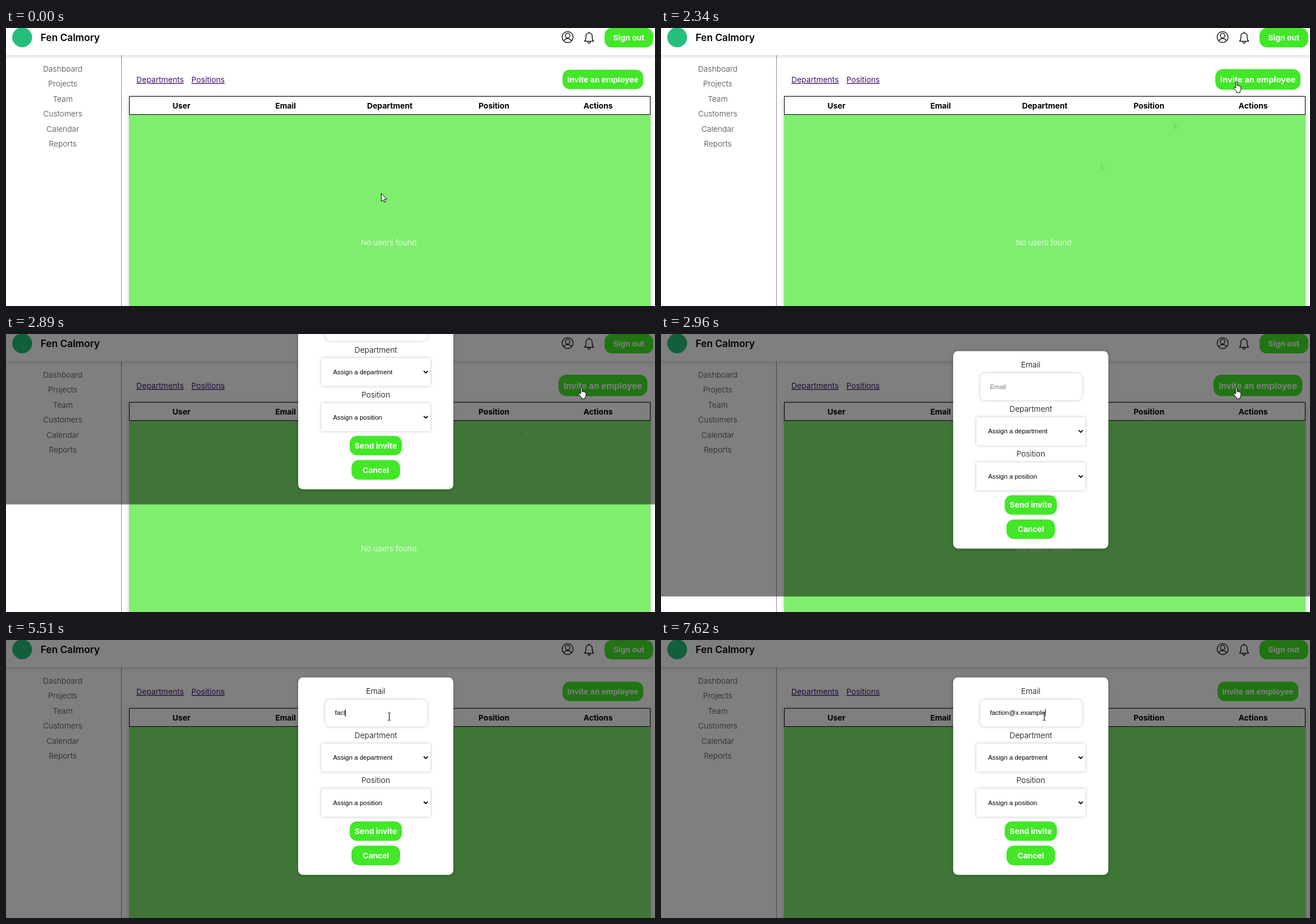
An HTML page that plays this animation: 1144x490 px, repeating every 8000 ms.

```html
<!DOCTYPE html>
<html lang="en">
<head>
<meta charset="utf-8">
<title>Invite an employee</title>
<style>
  html, body { margin: 0; width: 100%; height: 100%; overflow: hidden; background: #fff; }
  svg { display: block; width: 100vw; height: 100vh; }
  text { font: 300 13.71px Inter, sans-serif; fill: #000; white-space: pre; }
  .mid { text-anchor: middle; }
  .bold { font-weight: 700; }
  .brand { font-size: 17.14px; font-weight: 600; }
  .nav { fill: #444; }
  .link { fill: #3f1470; font-weight: 400; text-decoration: underline; }
  .empty { fill: #fff; }
  .field { font: 11.43px "Liberation Sans", Arial, sans-serif; }
  .hint { fill: #757575; }
  .button rect { fill: #42e728; }
  .button text { fill: #fff; font-weight: 700; text-anchor: middle; }
  .box { fill: #fff; filter: drop-shadow(0 0 2.5px rgba(0, 0, 0, .25)); }
  .icon { fill: none; stroke: #000; stroke-width: 1.3; stroke-linejoin: round; }
  .pointer { fill: #fff; stroke: #000; stroke-linejoin: round; }
</style>
</head>
<body>
<svg viewBox="0 0 1144 490" preserveAspectRatio="none">
  <defs>
    <path id="arrowShape" d="M.5.5V14.7L3.7 11.7 6 16.4 8.2 15.4 6 10.7H10.3Z"/>
    <clipPath id="listArea"><path d="M217 153.5H1136V490H217Z"/></clipPath>
  </defs>

  <rect width="1144" height="490" fill="#fff"/>
  <path d="M203.5 48V490" stroke="#8a8a8a"/>
  <rect x="-10" y="-10" width="1164" height="58" fill="#fff" style="filter:drop-shadow(0 1px 3px rgba(0,0,0,.2))"/>
  <circle cx="28.5" cy="16.5" r="17.5" fill="#25bf7b"/>
  <text class="brand" x="61" y="23">Fen Calmory</text>
  <g class="icon">
    <circle cx="990" cy="16" r="9.7"/>
    <circle cx="990" cy="13.4" r="4"/>
    <path d="M983.5 22.8Q985 18.6 990 18.6T996.5 22.8"/>
    <path d="M1019.8 23.4Q1022.3 21 1022.3 16V14Q1022.3 9.3 1027.8 8.6Q1033.3 9.3 1033.3 14V16Q1033.3 21 1035.8 23.4ZM1027.8 8.6V6.6M1025.6 24Q1025.8 26.9 1027.8 26.9T1030 24"/>
  </g>
  <g id="nav"></g>
  <text class="link" x="229.8" y="96">Departments</text>
  <text class="link" x="326.8" y="96">Positions</text>

  <rect x="217" y="121" width="919" height="400" fill="#7fee6f" style="filter:drop-shadow(0 0 3px rgba(0,0,0,.25))"/>
  <rect x="217.5" y="120.5" width="918" height="32" fill="#fff" stroke="#000"/>
  <g id="heads"></g>
  <text class="empty mid" x="676.5" y="383">No users found.</text>
  <g id="trail" clip-path="url(#listArea)"></g>
  <g id="pageButtons"></g>

  <rect id="shade" y="-520" width="1144" height="1017" fill="#000" fill-opacity=".5"/>
  <g id="modal">
    <rect x="515" y="66" width="273.5" height="348" rx="8.5" fill="#fff" style="filter:drop-shadow(0 1px 3px rgba(0,0,0,.25))"/>
    <rect class="box" x="562.5" y="105" width="180" height="47.5" rx="9"/>
    <rect class="box" x="556" y="182.5" width="192" height="49.5"/>
    <rect class="box" x="556" y="262" width="192" height="49.5"/>
    <g id="labels"></g>
    <text class="field" x="576.5" y="211">Assign a department</text>
    <text class="field" x="576.5" y="291">Assign a position</text>
    <path d="M736.3 205.3l3.6 3.6 3.6-3.6m-7.2 79.5l3.6 3.6 3.6-3.6" fill="none" stroke="#000" stroke-width="1.8"/>
    <text class="field hint" id="hint" x="579.8" y="132.4">Email</text>
    <text class="field" id="typed" x="579.8" y="132.4"></text>
    <rect id="caret" y="122" width="1" height="13"/>
    <g id="modalButtons"></g>
  </g>

  <g class="pointer">
    <use id="arrow" href="#arrowShape"/>
    <path id="hand" d="M4.5 12V2Q4.5.5 5.8.5T7.1 2V7.6Q8.7 6.4 9.7 8Q11.2 7.2 11.9 8.8Q13.7 8.4 13.7 10.4V14.5L12.2 18V20H5.9V18L1.2 12.5Q.5 11 1.8 10.4Q3 10 4.5 12Z"/>
    <path id="beam" fill="none" d="M-2.5-6.5H-1L0-6 1-6.5H2.5M0-6V6M-2.5 6.5H-1L0 6 1 6.5H2.5"/>
  </g>
</svg>
<script>
const LOOP = 8000;
const START = 1380, STEP = 68.8; // the screen refreshes in steps
const EMAIL = 'faction@x.example';
const BURSTS = [ // typing: first key, last key, number of keys
  { from: 4850, to: 5510, keys: 4 },
  { from: 5580, to: 5800, keys: 3 },
  { from: 6150, to: 7620, keys: 10 },
];

const $ = id => document.getElementById(id);
const clamp = (v, lo, hi) => Math.min(hi, Math.max(lo, v));
const progress = (k, from, to) => clamp((k - from) / (to - from), 0, 1);
const smooth = p => p * p * (3 - 2 * p);
const easeOut = p => 1 - (1 - p) ** 2;
const mix = (a, b, p) => a + (b - a) * p;
const move = (el, x, y) => el.setAttribute('transform', `translate(${x} ${y})`);
const show = (el, on) => el.style.display = on ? '' : 'none';

function add(parent, tag, attrs, text = '') {
  const el = document.createElementNS('http://www.w3.org/2000/svg', tag);
  for (const name in attrs) el.setAttribute(name, attrs[name]);
  el.textContent = text;
  return parent.appendChild(el);
}

function addButton(parent, label, x, y, width) {
  const g = add(parent, 'g', { class: 'button' });
  add(g, 'rect', { x, y, width, height: 34.3, rx: 12.8 });
  add(g, 'text', { x: x + width / 2, y: Math.round(y + 22.3) }, label);
  return g;
}

['Dashboard', 'Projects', 'Team', 'Customers', 'Calendar', 'Reports'].forEach((label, i) =>
  add($('nav'), 'text', { class: 'nav mid', x: 100, y: Math.floor(77 + 26.5 * i) }, label));
['User', 'Email', 'Department', 'Position', 'Actions'].forEach((label, i) =>
  add($('heads'), 'text', { class: 'bold mid', x: 309.3 + 183.6 * i, y: 142 }, label));
['Email', 'Department', 'Position'].forEach((label, i) =>
  add($('labels'), 'text', { class: 'mid', x: 651.8, y: Math.floor(95 + 78.7 * i) }, label));

addButton($('pageButtons'), 'Sign out', 1055, 0, 85.7);
const invite = addButton($('pageButtons'), 'Invite an employee', 981, 73.4, 142.4);
addButton($('modalButtons'), 'Send invite', 605.8, 319.8, 92);
addButton($('modalButtons'), 'Cancel', 609, 362.6, 85.7);

// A shallow arc from the list up to the invite button.
function approach(k) {
  const p = smooth(progress(k, -.5, 11));
  return [mix(661, 995, p), mix(291, 104, p) + 11 * Math.sin(Math.PI * p)];
}

function toField(k) {
  const p = smooth(progress(k, 23.5, 33));
  return [mix(1010, 675.5, p), mix(97, 135, p)];
}

// Faint afterimages left along the way.
const trail = [4, 7, 8].map(k => {
  const el = add($('trail'), 'use', { href: '#arrowShape', opacity: .07 });
  move(el, ...approach(k));
  return { k, el };
});

function drawPointer(t, k) {
  const clicking = t >= 4050 && t < 4120;
  const hovering = k >= 12 && k < 24;
  const kind = hovering ? 'hand' : k < 30 || clicking ? 'arrow' : 'beam';
  for (const id of ['arrow', 'hand', 'beam']) show($(id), id === kind);
  const spot = hovering ? [1008.5, 94] : clicking ? [673.5, 128] : k < 12 ? approach(k) : toField(k);
  move($(kind), ...spot);
}

function drawField(t) {
  const count = BURSTS.reduce((sum, { from, to, keys }) =>
    sum + clamp(Math.floor((t - from) / (to - from) * (keys - 1)) + 1, 0, keys), 0);
  const typed = $('typed');
  typed.textContent = EMAIL.slice(0, count);
  show($('hint'), !count);
  show($('caret'), t >= 4050 && (t < 4590 || count));
  const width = count ? typed.getComputedTextLength() : 0;
  $('caret').setAttribute('x', Math.round(579.8 + width));
}

function draw(t) {
  const k = Math.max(-1, Math.floor((t - START + 8) / STEP));
  const scale = 1 + .1 * (easeOut(progress(k, 12, 18)) - easeOut(progress(k, 23, 28)));
  invite.setAttribute('transform', `translate(1052.2 90.6) scale(${scale}) translate(-1052.2 -90.6)`);
  move($('shade'), 0, mix(-514, 0, smooth(progress(k, 19.8, 23.6))));
  move($('modal'), 0, mix(-414, 0, smooth(progress(k, 19.1, 23.86))));
  show($('shade'), k >= 20);
  show($('modal'), k >= 20);
  for (const ghost of trail) show(ghost.el, k > ghost.k && k < 23);
  drawField(t);
  drawPointer(t, k);
}

const began = performance.now();
function frame() {
  draw((performance.now() - began) % LOOP);
  requestAnimationFrame(frame);
}
frame();
</script>
</body>
</html>
```
